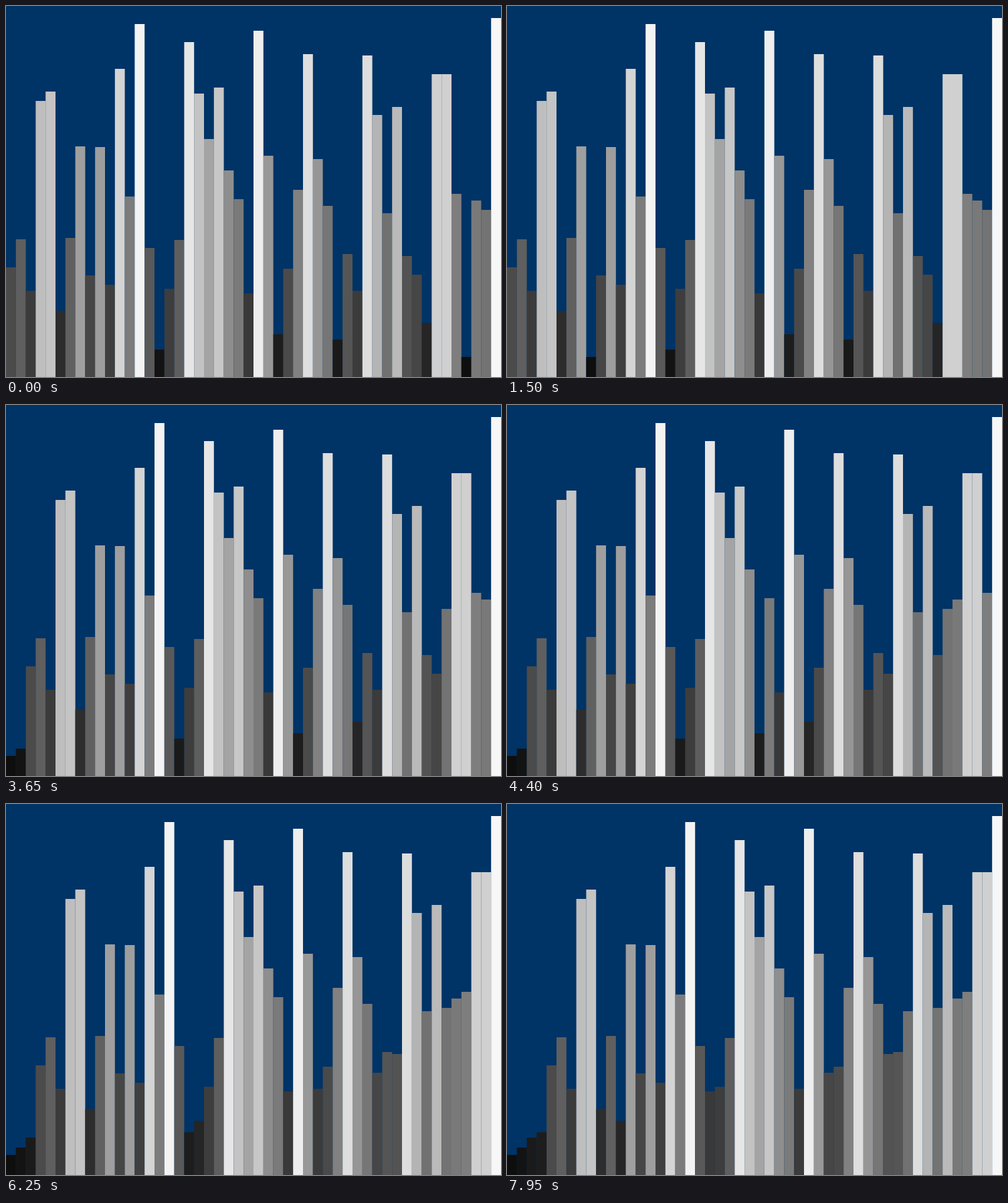
Animation of 740x555 px, one loop 8 s. Source, as a matplotlib script:

```python
import matplotlib.pyplot as plt
from matplotlib.animation import FuncAnimation

W, H, DPI = 740, 555, 100
FRAMES, INTERVAL = 160, 50
TICK = 40  # ms per sorting step
PHASE = 20  # ms already spent in the current step at the start

TOPS = [391, 349, 426, 142, 128, 456, 347, 210, 403, 211,
        417, 94, 285, 27, 362, 514, 423, 350, 54, 131,
        199, 122, 246, 289, 430, 37, 224, 491, 393, 275,
        72, 229, 299, 499, 371, 426, 74, 163, 310, 151,
        374, 402, 474, 102, 102, 281, 525, 291, 305, 18]
START = 46  # the first pass is already under way


def bubble_steps(values, start):
    """List the array after every swap and at the end of every pass."""
    a = list(values)
    steps = [a[:]]
    last = len(a) - 1
    for low in range(last):
        for j in range(start if low == 0 else last, low, -1):
            if a[j] < a[j - 1]:
                a[j], a[j - 1] = a[j - 1], a[j]
                steps.append(a[:])
        steps.append(a[:])
    return steps


steps = bubble_steps([H - top for top in TOPS], START)

fig = plt.figure(figsize=(W / DPI, H / DPI), dpi=DPI, facecolor="#003366")
ax = fig.add_axes([0, 0, 1, 1])
ax.set_xlim(0, W)
ax.set_ylim(0, H)
ax.axis("off")

bar_w = W / len(TOPS)
bars = ax.bar([i * bar_w for i in range(len(TOPS))], steps[0],
              width=bar_w, align="edge", linewidth=0)
for bar in bars:
    bar.set_snap(False)


def draw(frame):
    step = (frame * INTERVAL + PHASE) // TICK
    for bar, h in zip(bars, steps[step]):
        bar.set_height(h)
        bar.set_facecolor((h / H,) * 3)
    return list(bars)


anim = FuncAnimation(fig, draw, frames=FRAMES, interval=INTERVAL,
                     init_func=lambda: draw(0), repeat=True, repeat_delay=0)
plt.show()
```
